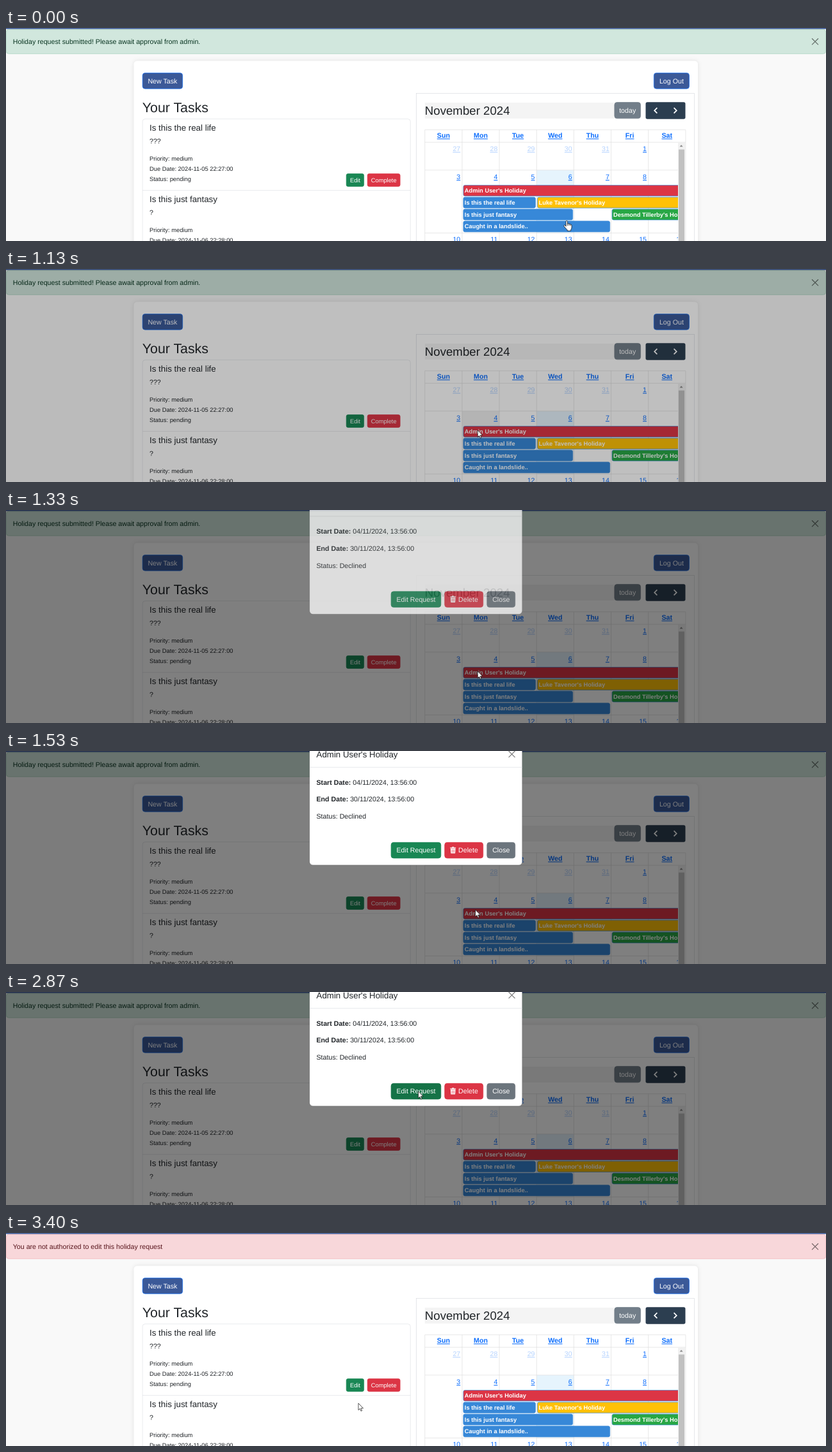
An HTML page that plays this animation: 1280 px wide and 334 px high, repeating every 4740 ms.

```html
<!DOCTYPE html>
<html lang="en">
<head>
<meta charset="utf-8">
<title>Task board</title>
<style>
html, body { margin: 0; height: 100%; overflow: hidden; background: #f9f9f9; }
svg { display: block; width: 100%; height: 100%; font-family: "Liberation Sans", Arial, sans-serif; text-rendering: geometricPrecision; }
.link { fill: #0d6efd; text-decoration: underline; }
</style>
</head>
<body>
<svg id="stage" viewBox="0 0 1280 334"></svg>
<script>
const INK = '#212529', GREEN = '#198754', RED = '#dc3545', BLUE = '#3b5998', EVENT = '#3788d8';
const BASE = 32 / 3, SMALL = 28 / 3, HEAD = 40 / 3;
const GRID_X = 653.8, COL = 58.15, HAIR = 0.67;

// y is the middle of the line
const text = (x, y, size, str, attrs = `fill="${INK}"`) =>
  `<text x="${x}" y="${y + size * 0.35}" font-size="${size}" ${attrs}>${str}</text>`;
const rect = (x, y, w, h, fill, attrs = '') =>
  `<rect x="${x}" y="${y}" width="${w}" height="${h}" fill="${fill}" ${attrs}/>`;
const outlined = (x, y, w, h, fill, stroke, r) =>
  rect(x + HAIR / 2, y + HAIR / 2, w - HAIR, h - HAIR, fill, `rx="${r}" stroke="${stroke}" stroke-width="${HAIR}"`);
const line = (d, color, width = HAIR, attrs = '') =>
  `<path d="${d}" fill="none" stroke="${color}" stroke-width="${width}" ${attrs}/>`;
const cross = (x, y) =>
  line(`M${x - 4.6} ${y - 4.6}l9.2 9.2m0-9.2l-9.2 9.2`, '#000', 1.3, 'stroke-linecap="round" opacity=".5"');
const button = (x, y, w, h, label, fill, size = BASE, stroke = fill, attrs = '') =>
  `<g ${attrs}>` + outlined(x, y, w, h, fill, stroke, size === BASE ? 4 : 2.7) +
  text(x + w / 2, y + h / 2, size, label, 'fill="#fff" text-anchor="middle"') + '</g>';

const alertBox = (id, msg, fill, stroke, ink) =>
  `<g id="${id}">` + outlined(0, 2, 1280, 38.7, fill, stroke, 4) +
  text(10.7, 21.2, BASE, msg, `fill="${ink}"`) + cross(1263, 21.3) + '</g>';

const task = (y, title, note, due) =>
  text(224, y + 14, HEAD, title) + text(224, y + 34.8, BASE, note) +
  ['Priority: medium', 'Due Date: ' + due, 'Status: pending']
    .map((s, i) => text(224, y + 62 + i * 16, SMALL, s)).join('') +
  button(530.9, y + 85.8, 28.1, 20.6, 'Edit', GREEN, SMALL) +
  button(563.9, y + 85.8, 51.6, 20.6, 'Complete', RED, SMALL);

const bar = (row, x, end, fill, label) => {
  const y = 246.2 + row * 18.75;
  return outlined(x, y, end - x, 17.6, fill, EVENT, 2.5) +
    text(x + 2.2, y + 8.7, SMALL, label, 'fill="#fff" font-weight="bold"');
};

const days = (first, y, attrs = '') => [...Array(7).keys()].map(i => {
  const n = first + i, past = n < 1;
  return text(GRID_X + (i + 1) * COL - 2.7, y, BASE, past ? n + 31 : n,
    `class="link" text-anchor="end" ${past ? 'opacity=".3"' : ''}`);
}).join('');

function calendar() {
  const names = ['Sun', 'Mon', 'Tue', 'Wed', 'Thu', 'Fri', 'Sat'];
  let verticals = '';
  for (let i = 0; i < 8; i++) verticals += `M${GRID_X + i * COL} 159.7V334`;
  return outlined(640, 102.3, 434.7, 260, '#fff', '#d9dce0', 0) +
    rect(653.8, 117, 295.7, 25, '#f4f4f4') +
    text(653.8, 129.5, 56 / 3, 'November 2024') +
    button(949.5, 116.2, 41.4, 26, 'today', '#727e89') +
    rect(998.5, 116.2, 62, 26.6, '#2c3e50', 'rx="2.7"') +
    line('M1016.4 125.2l-4.2 4.2 4.2 4.2M1042.6 125.2l4.2 4.2-4.2 4.2', '#fff', 1.7) +
    rect(GRID_X + 3 * COL, 222.8, COL, 98.6, '#e6f4fd') +
    rect(0, 222.8, COL, 98.6, '#f0f0f0', 'id="hover"') +
    line(verticals + 'M653.8 159.7H1060.9M653.8 179.2H1060.9M653.8 222.8H1049M653.8 321.4H1049', '#ddd') +
    names.map((n, i) => text(GRID_X + (i + 0.5) * COL, 168.6, BASE, n,
      'class="link" font-weight="bold" text-anchor="middle"')).join('') +
    '<g clip-path="url(#body)">' + days(-4, 189.6) + days(3, 233.5) + days(10, 331.4) +
    bar(0, 713.6, 1070, RED, "Admin User's Holiday") +
    bar(1, 713.6, 826.8, EVENT, 'Is this the real life') +
    bar(2, 713.6, 884.9, EVENT, 'Is this just fantasy') +
    bar(3, 713.6, 943, EVENT, 'Caught in a landslide..') +
    bar(1, 829.3, 1070, '#ffc107', "Luke Tavenor's Holiday") +
    bar(2, 945.7, 1070, '#28a745', "Desmond Tillerby's Holiday") + '</g>' +
    rect(1049, 179.6, 11, 160, '#f1f1f1') + rect(1050, 190.5, 9, 150, '#c1c1c1') +
    '<path d="M1051.6 186.3h5l-2.5-3z" fill="#8a8a8a"/>';
}

function modal() {
  const detail = (y, key, value) => text(484.5, y, BASE, `<tspan font-weight="bold">${key}</tspan> ${value}`);
  return '<g id="modal">' + outlined(473.6, -16, 332.4, 195.2, '#fff', 'rgba(0,0,0,.18)', 5.3) +
    text(484.5, 5, HEAD, "Admin User's Holiday") + cross(789.6, 5) +
    line('M474 25.5H805.6', '#dee2e6') +
    detail(49, 'Start Date:', '04/11/2024, 13:56:00') +
    detail(75.7, 'End Date:', '30/11/2024, 13:56:00') +
    text(484.5, 102.4, BASE, 'Status: Declined') +
    button(600.8, 143, 78.4, 25.4, 'Edit Request', GREEN, BASE, GREEN, 'id="edit"') +
    outlined(684.4, 143, 60.7, 25.4, RED, RED, 4) +
    '<path d="M693.3 151.2h2.6l.6-1h2.5l.6 1h2.6v1.2h-8.9zM693.9 153h7.7l-.5 7.6h-6.7z" fill="#fff"/>' +
    line('M696 154.3v5m1.75-5v5m1.75-5v5', RED, 0.6) +
    text(706.1, 155.7, BASE, 'Delete', 'fill="#fff"') +
    button(750.5, 143, 44.6, 25.4, 'Close', '#6c757d') + '</g>';
}

const cursors = '<g id="cursor" fill="#fff" stroke="#000" stroke-linejoin="round">' +
  '<path id="arrow" transform="scale(.67)" d="M.5 .5V16.5L4 13.2 6.5 18.9 9 17.8 6.5 12.3H11.8Z"/>' +
  '<path id="hand" transform="scale(.7)" d="M-2 12V2a1.7 1.7 0 0 1 3.4 0V8a1.7 1.7 0 0 1 3.4 .5 1.7 1.7 0 0 1 3.3 .8' +
  ' 1.6 1.6 0 0 1 2.7 1V15q0 3-2 5.5V23H1V21Q-3 17-6.5 12.5q-.8-2 .8-2.4 1.5-.3 3.7 2.9ZM1.4 8v3.5M4.8 8.5v3M8.1 9.3v2.5"/></g>';

const $ = id => document.getElementById(id);
$('stage').innerHTML =
  '<defs><clipPath id="body"><path d="M653 179H1049V334H653z"/></clipPath></defs>' +
  rect(0, 0, 1280, 334, '#f9f9f9') + rect(0, 0, 1280, 1.6, BLUE) +
  alertBox('ok', 'Holiday request submitted! Please await approval from admin.', '#d1e7dd', '#a3cfbb', '#0a3622') +
  alertBox('denied', 'You are not authorized to edit this holiday request', '#f8d7da', '#f1aeb5', '#58151c') +
  rect(199.5, 51.5, 880.5, 320, '#fff', 'rx="5.3" style="filter:drop-shadow(0 0 3px rgba(0,0,0,.1))"') +
  button(212.8, 70.2, 63.2, 25.4, 'New Task', BLUE, BASE, '#0d6efd') +
  button(1011, 70.2, 55.8, 25.4, 'Log Out', BLUE, BASE, '#0d6efd') +
  text(212.8, 124.3, 64 / 3, 'Your Tasks') +
  outlined(212.8, 142.3, 418.8, 230, '#fff', '#dee2e6', 4) + line('M213 254.6H631.3', '#dee2e6') +
  task(142.4, 'Is this the real life', '???', '2024-11-05 22:27:00') +
  task(254.5, 'Is this just fantasy', '?', '2024-11-06 22:28:00') +
  calendar() + rect(0, 0, 1280, 334, '#000', 'id="shade"') + modal() + cursors;

const LOOP = 4740, STEP = 200 / 3;
const RELOAD = 2930;
const moves = [
  [0, 560, 875.5, 302, 736, 252.5],
  [1467, 2030, 736, 252.5, 643.3, 155.5],
  [2867, 3380, 643.3, 155.5, 549.7, 266.6],
];
const part = (t, from, to) => Math.min(1, Math.max(0, (t - from) / (to - from)));
const smooth = p => p * p * (3 - 2 * p);

// CSS ease-out: cubic-bezier(0, 0, .58, 1)
function easeOut(p) {
  let lo = 0, hi = 1;
  for (let i = 0; i < 20; i++) {
    const s = (lo + hi) / 2;
    if (1.74 * s * s - 0.74 * s ** 3 < p) lo = s; else hi = s;
  }
  return smooth(lo);
}

const show = (id, on) => $(id).setAttribute('visibility', on ? 'visible' : 'hidden');

function draw(now) {
  // the screen advances in steps of 1/15 s
  const t = Math.floor((now % LOOP + 4) / STEP) * STEP;
  const [from, to, x0, y0, x1, y1] = moves.filter(m => t >= m[0]).pop();
  const p = smooth(part(t, from, to));
  const x = x0 + (x1 - x0) * p, y = y0 + (y1 - y0) * p;
  const loaded = t >= RELOAD;
  const overEdit = t > 1530 && !loaded && x > 600 && x < 679 && y > 143 && y < 168;
  const hand = t < 999 || (overEdit && t < 2399);

  $('cursor').setAttribute('transform', `translate(${x} ${y})`);
  show('hand', hand);
  show('arrow', !hand);
  show('ok', !loaded);
  show('denied', loaded);

  const col = Math.floor((x - GRID_X) / COL);
  show('hover', t < 1199 && col !== 3);
  $('hover').setAttribute('x', GRID_X + col * COL);

  $('shade').setAttribute('opacity', loaded ? 0 : 0.5 * part(t, 1058, 1208));
  $('modal').setAttribute('opacity', loaded ? 0 : part(t, 1223, 1373));
  $('modal').setAttribute('transform', `translate(0 ${-100 / 3 * (1 - easeOut(part(t, 1223, 1523)))})`);

  const pressed = t > 2399 && t < 2466;
  const box = $('edit').firstChild, color = pressed ? '#146c43' : overEdit ? '#157347' : GREEN;
  box.setAttribute('fill', color);
  box.setAttribute('stroke', color);
}

let start;
function tick(now) {
  start ??= now;
  draw(now - start);
  requestAnimationFrame(tick);
}
draw(0);
requestAnimationFrame(tick);
</script>
</body>
</html>
```
